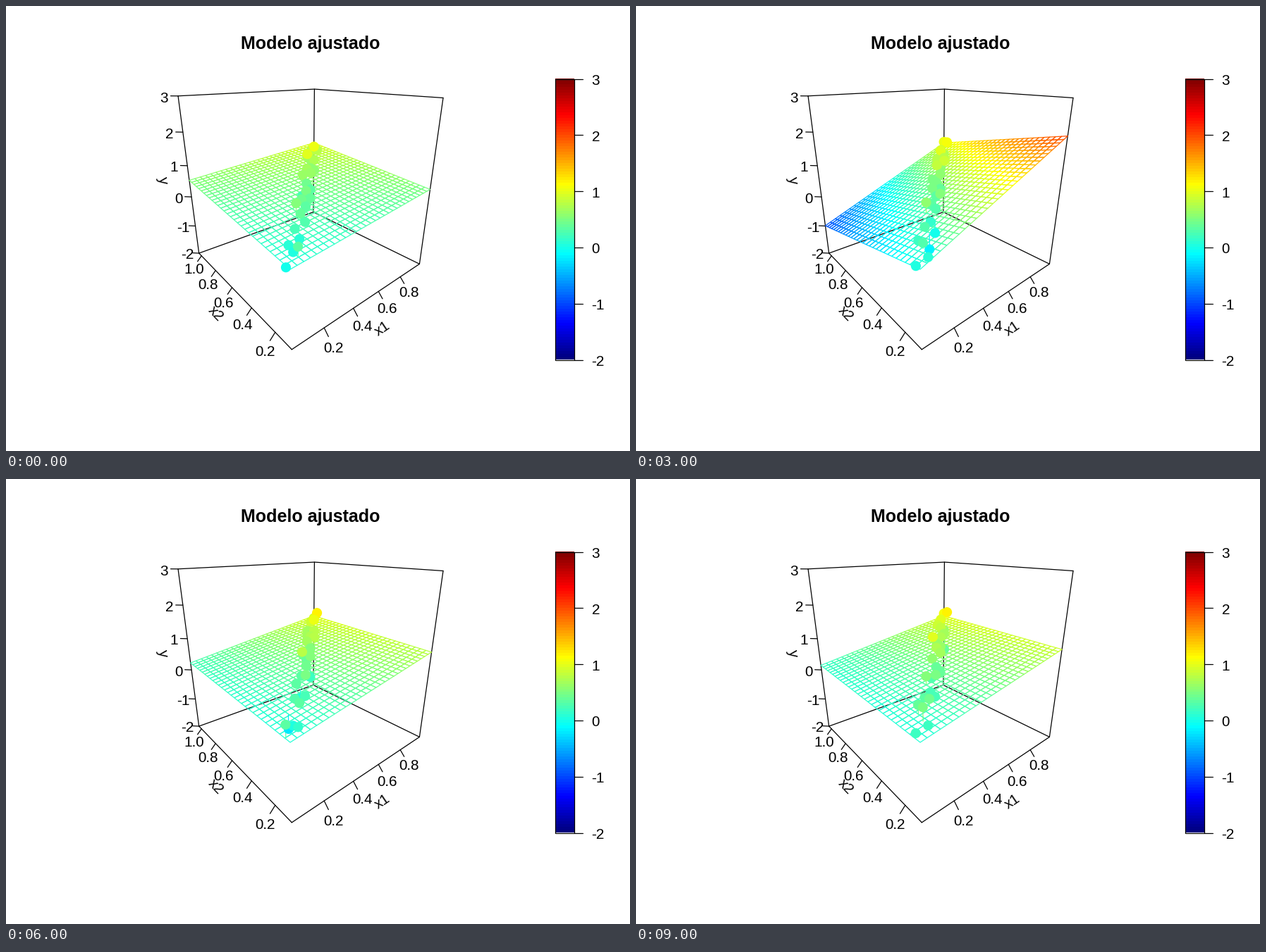
A matplotlib script that plays this animation: 885 px wide and 632 px high, repeating every 10 s.

```python
import numpy as np
import matplotlib.pyplot as plt
from matplotlib.animation import FuncAnimation
from matplotlib.collections import LineCollection, PolyCollection
from matplotlib.colors import LinearSegmentedColormap, Normalize
from matplotlib.patches import Rectangle

W, H, DPI = 885, 632, 100
PX = 72 / DPI
FONT = 20.8 * PX
LINE = 1.25 * PX

plt.rcParams["font.family"] = "Liberation Sans"
jet = LinearSegmentedColormap.from_list(
    "jet9", ["#00007F", "blue", "#007FFF", "cyan", "#7FFF7F",
             "yellow", "#FF7F00", "red", "#7F0000"], N=100)
norm = Normalize(-2, 3)

# Camera: the data box spans -1..1 on every axis.
CX, CY, SCALE = 425.6, 254.3, 451.8
EYE = 2 + np.sqrt(3)
ST, CT = np.sin(np.radians(40)), np.cos(np.radians(40))
SP, CP = np.sin(np.radians(20)), np.cos(np.radians(20))


def project(x, y, z):
    side, depth = x * CT - y * ST, x * ST + y * CT
    w = EYE + depth * CP - z * SP
    return np.stack([CX + SCALE * side / w,
                     CY - SCALE * (z * CP + depth * SP) / w], axis=-1)


def unit(v):
    return (v - 0.5) / 2.5


# The two predictors are nearly equal, so the fit swings about the diagonal.
# Each step is set by how far the left corner rises above the middle.
tilts = [0.03, 0.76, -2.18, -1.5, 0.36, -0.09, -0.28, -2.36, 1.48, -0.36]
FRONT, MIDDLE = 0.04, 0.51


def plane(step, x, y):
    left, right = MIDDLE + tilts[step], MIDDLE - tilts[step]
    return FRONT + (right - FRONT) * (x + 1) / 2 + (left - FRONT) * (y + 1) / 2


# Observations lie along the diagonal with a small even sideways spread.
COUNT, NOISE = 29, 0.17
k = np.arange(COUNT)[::-1]
trend = 0.02 + 0.97 * k / (COUNT - 1)
shift = 0.14 * ((0.618 * k + 0.2) % 1 - 0.5)
px = 2 * trend - 1 + shift * CT
py = 2 * trend - 1 - shift * ST

fig = plt.figure(figsize=(W / DPI, H / DPI), dpi=DPI, facecolor="white")
ax = fig.add_axes([0, 0, 1, 1])
ax.axis("off")


def stroke(pts, z=1):
    xs, ys = np.array(pts).T
    ax.plot(xs, ys, color="black", lw=LINE, zorder=z,
            solid_capstyle="round", solid_joinstyle="round")


def label(x, y, text, ha="center"):
    ax.text(x, y + 8.5, text, fontsize=FONT, ha=ha, va="baseline")


def box_tick(base, step, text):
    a, b, c = (project(*(np.array(base) + d * np.array(step)))
               for d in (0, 0.06, 0.12))
    stroke([a, b])
    label(c[0] + 1, c[1] + 0.7, text)


def draw_box():
    floor = [(-1, -1), (1, -1), (1, 1), (-1, 1), (-1, -1)]
    stroke([project(x, y, -1) for x, y in floor])
    stroke([project(x, y, 1) for x, y in floor[1:4]])
    for x, y in floor[1:4]:
        stroke([project(x, y, -1), project(x, y, 1)])
    for v in (0.2, 0.4, 0.6, 0.8):
        box_tick((2 * (v - 0.011) / 0.99 - 1, -1, -1), (0, -1, -1), f"{v:.1f}")
    for v in (0.2, 0.4, 0.6, 0.8, 1.0):
        box_tick((-1, 2 * (v - 0.08) / 0.959 - 1, -1), (-1, 0, -1), f"{v:.1f}")
    for v in range(-2, 4):
        box_tick((-1, 1, unit(v)), (-1, 1, 0), str(v))
    for x, y, text, angle in ((534, 458.5, "x1", 34), (297, 437.5, "x2", -46),
                              (222, 248, "y", -82)):
        ax.text(x, y, text, fontsize=FONT, ha="center", va="center",
                rotation=angle)


def draw_key():
    x0, x1, top, bottom = 778.5, 805.5, 103.5, 502.5
    ax.imshow(np.linspace(3, -2, 100)[:, None], cmap=jet, norm=norm,
              extent=(x0, x1, bottom, top), aspect="auto",
              interpolation="nearest")
    ax.add_patch(Rectangle((x0, top), x1 - x0, bottom - top, fill=False,
                           ec="black", lw=LINE, zorder=2, snap=True))
    for v in range(-2, 4):
        y = bottom - (v + 2) / 5 * (bottom - top)
        stroke([(x1, y), (x1 + 12.5, y)], 2)
        label(830.5, y, str(v), "left")


draw_box()
draw_key()
ax.text(432, 61, "Modelo ajustado", fontsize=25 * PX, weight="bold",
        ha="center", va="baseline")
ax.set_xlim(0, W)
ax.set_ylim(H, 0)

mesh = PolyCollection([], facecolors="none", linewidths=LINE, zorder=3)
drops = LineCollection([], linewidths=LINE, zorder=4)
dots = ax.scatter([], [], s=(14.2 * PX) ** 2, linewidths=0, zorder=5)
ax.add_collection(mesh, autolim=False)
ax.add_collection(drops, autolim=False)

GRID = np.linspace(-1, 1, 30)
gx, gy = np.meshgrid(GRID, GRID, indexing="ij")


def update(step):
    v = plane(step, gx, gy)
    p = project(gx, gy, unit(v))
    cells = np.stack([p[:-1, :-1], p[1:, :-1], p[1:, 1:], p[:-1, 1:]], axis=2)
    mid = (v[:-1, :-1] + v[1:, 1:]) / 2
    mesh.set_verts(cells.reshape(-1, 4, 2)[::-1])
    mesh.set_edgecolor(jet(norm(mid.ravel()[::-1])))

    rng = np.random.default_rng(40 + step)
    response = trend + rng.normal(0, NOISE, COUNT)
    tips = project(px, py, unit(response))
    feet = project(px, py, unit(plane(step, px, py)))
    colors = jet(norm(response))
    drops.set_segments(np.stack([tips, feet], axis=1))
    drops.set_color(colors)
    dots.set_offsets(tips)
    dots.set_facecolor(colors)
    return mesh, drops, dots


anim = FuncAnimation(fig, update, frames=len(tilts), interval=1000,
                     init_func=lambda: update(0), repeat=True, repeat_delay=0)
plt.show()
```
